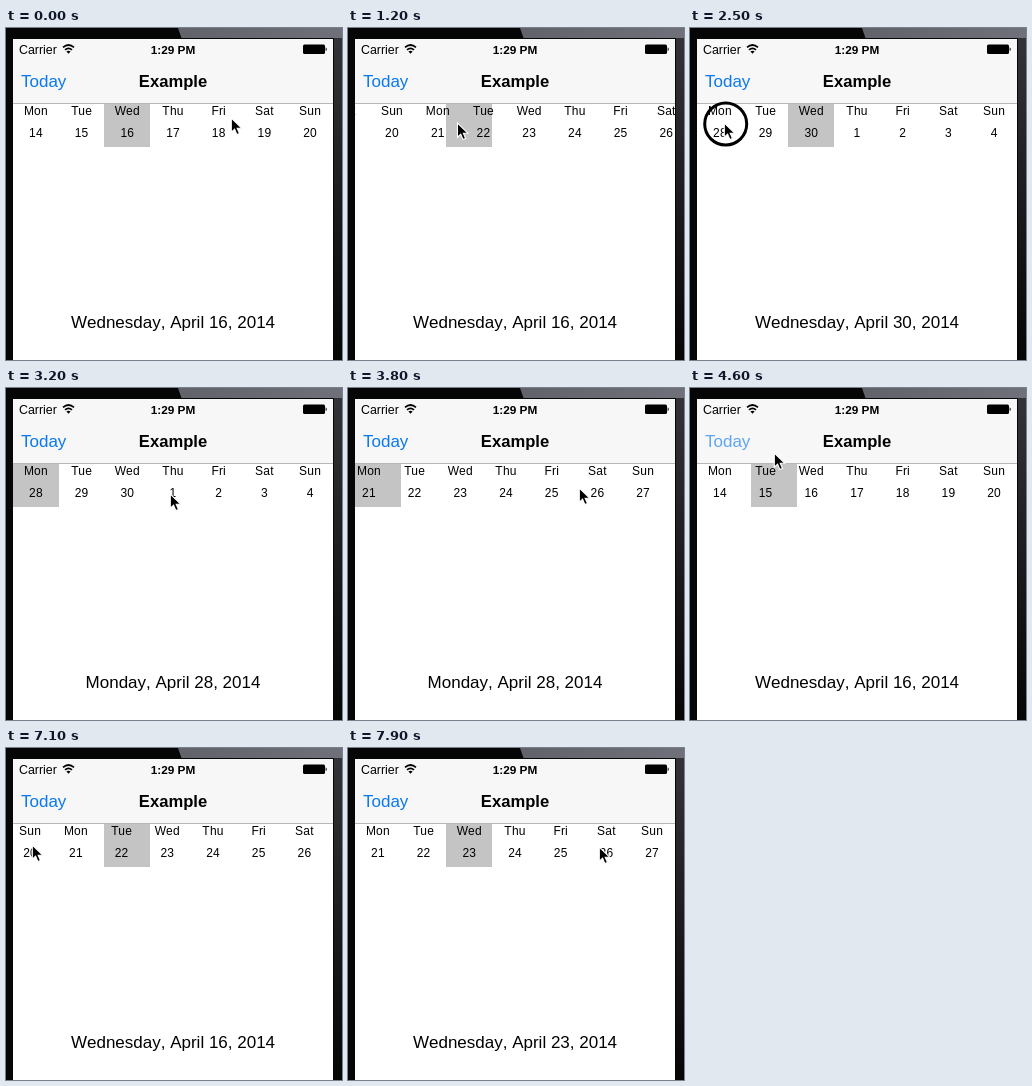
Animation, 336 px wide and 332 px high, one loop 8000 ms. Source, as an HTML page:

```html
<!DOCTYPE html>
<html lang="en">
<head>
<meta charset="utf-8">
<title>Week calendar</title>
<style>
html, body { margin: 0; width: 100%; height: 100%; overflow: hidden; background: #000; }
svg { display: block; width: 336px; height: 332px; font-family: "Liberation Sans", Arial, sans-serif; }
.mid { text-anchor: middle; }
.days { font-size: 12px; letter-spacing: .2px; }
</style>
</head>
<body>
<svg viewBox="0 0 336 332">
  <defs>
    <linearGradient id="gloss" x1="0" x2="1">
      <stop offset="0" stop-color="#62626a"/>
      <stop offset="1" stop-color="#70707a"/>
    </linearGradient>
    <linearGradient id="side" x1="0" y1="0" x2="0" y2="1">
      <stop offset="0" stop-color="#34343a"/>
      <stop offset="1" stop-color="#060607"/>
    </linearGradient>
    <clipPath id="screen"><rect x="7" y="11" width="320" height="321"/></clipPath>
  </defs>
  <rect width="336" height="332" fill="#060607"/>
  <rect x="328" width="8" height="332" fill="url(#side)"/>
  <path d="M172 0H336V10H175.5Z" fill="url(#gloss)"/>
  <rect x="7" y="11" width="320" height="321" fill="#fff"/>
  <g clip-path="url(#screen)">
    <rect id="mark" y="75" width="46" height="44" fill="#c4c4c4"/>
    <g id="days" class="mid days"></g>
  </g>
  <rect x="7" y="11" width="320" height="64" fill="#f7f7f7"/>
  <rect x="7" y="75" width="320" height="1" fill="#b8b8b8"/>

  <text x="13" y="26" font-size="12.4">Carrier</text>
  <g fill="none" stroke="#000" stroke-width="1.7">
    <path d="M57 19.4Q62.5 14.6 68 19.4"/>
    <path d="M59 21.9Q62.5 18.8 66 21.9"/>
  </g>
  <path d="M60.4 23.5Q62.5 21.8 64.6 23.5L62.5 25.8Z"/>
  <text class="mid" x="167" y="26" font-size="11.8" font-weight="bold">1:29 PM</text>
  <rect x="297" y="16.5" width="22" height="9.5" rx="1.5"/>
  <path d="M319.6 19.2Q322 21.2 319.6 23.2Z"/>

  <text id="today" x="15" y="59" font-size="17" fill="#0a78f0">Today</text>
  <text class="mid" x="167" y="59" font-size="16.6" font-weight="bold">Example</text>
  <text id="date" class="mid" x="167" y="300" font-size="17" style="font-kerning: none"></text>

  <g id="cursor">
    <circle id="ring" cx=".7" cy="1" r="21" fill="none" stroke="#000" stroke-width="3"/>
    <path d="M-.7 0V14.2L2.6 11.2L4.9 16.6L7.5 15.5L5.2 10.2H9.7Z" stroke="#fff" stroke-width="1.1"/>
  </g>
</svg>
<script>
const LOOP = 8000, FRAME = 100, LEFT = 7, WIDTH = 320, COL = WIDTH / 7;
const FIRST = 14, TODAY = 16;
const LEAD = 40, HOLD = 150, SLIDE = 250, TURN = 500;
const NAMES = ["Monday", "Tuesday", "Wednesday", "Thursday", "Friday", "Saturday", "Sunday"];

// Pointer actions: tap picks a day, home presses Today, turn swipes by weeks
const moves = [
  { at: 150, x: 215, y: 95, tap: 18 },
  { at: 500, x: 36, y: 40, tap: TODAY, home: true },
  { at: 986, x: 299, y: 95, to: 106, turn: 1 },
  { at: 1880, x: 285, y: 96, to: 90, turn: 1 },
  { at: 2450, x: 35, y: 95, tap: 28 },
  { at: 3150, x: 165, y: 106 },
  { at: 3452, x: 150, y: 100, to: 232, turn: -1 },
  { at: 3800, x: 232, y: 100 },
  { at: 4410, x: 38, y: 53, tap: TODAY, home: true },
  { at: 4640, x: 85, y: 65 },
  { at: 5150, x: 152, y: 106 },
  { at: 5700, x: 166, y: 8 },
  { at: 6200, x: 52, y: 55 },
  { at: 6850, x: 226, y: 97, to: 27, turn: 1 },
  { at: 7150, x: 27, y: 97 },
  { at: 7900, x: 252, y: 99 }
];

const el = id => document.getElementById(id);
const unit = p => Math.min(1, Math.max(0, p));
const smooth = p => p * p * (3 - 2 * p);
const easeOut = p => 1 - (1 - p) ** 3;
const weekday = d => (d - FIRST) % 7;

for (let d = FIRST; d < FIRST + 21; d++) {
  const x = (LEFT + COL * (d - FIRST + .5)).toFixed(1);
  const add = (y, s) => {
    const n = document.createElementNS("http://www.w3.org/2000/svg", "text");
    n.setAttribute("x", x);
    n.setAttribute("y", y);
    n.textContent = s;
    el("days").append(n);
  };
  add(87, NAMES[weekday(d)].slice(0, 3));
  add(109, d > 30 ? d - 30 : d);
}

function calendar(t) {
  let week = 0, col = weekday(TODAY), day = TODAY, fade = 1;
  for (const m of moves) {
    const age = t - m.at;
    if (age < 0) break;
    if (m.turn) {
      week += m.turn * easeOut(unit(age / TURN));
      if (age >= TURN) day += 7 * m.turn;
    }
    if (m.tap) {
      col += (weekday(m.tap) - col) * smooth(unit((age - 50) / SLIDE));
      if (age > 80) day = m.tap;
    }
    if (m.home) {
      fade = .2 + .8 * unit((age - 80) / 200);
      if (age > 50) week = 0;
    }
  }
  return { week, col, day, fade };
}

function pointer(t) {
  let last = { x: 226, y: 90, end: 0 };
  for (const m of moves) {
    const start = m.at - LEAD, end = m.at + HOLD, to = m.to ?? m.x;
    if (t < start) {
      const p = smooth((t - last.end) / (start - last.end));
      return { x: last.x + (m.x - last.x) * p, y: last.y + (m.y - last.y) * p, down: false };
    }
    if (t < end) {
      const p = smooth(unit((t - m.at) / HOLD));
      return { x: m.x + (to - m.x) * p, y: m.y, down: Boolean(m.tap || m.turn) };
    }
    last = { x: to, y: m.y, end };
  }
  return { ...last, down: false };
}

function draw(t) {
  const { week, col, day, fade } = calendar(t);
  const { x, y, down } = pointer(t);
  el("days").setAttribute("transform", `translate(${-WIDTH * week} 0)`);
  el("mark").setAttribute("x", Math.round(LEFT + COL * col));
  el("today").setAttribute("opacity", fade);
  el("date").textContent = `${NAMES[weekday(day)]}, April ${day}, 2014`;
  el("cursor").setAttribute("transform", `translate(${x} ${y})`);
  el("ring").setAttribute("opacity", down ? 1 : 0);
}

// The picture advances ten times a second
function tick() {
  draw(Math.floor(performance.now() % LOOP / FRAME) * FRAME);
  requestAnimationFrame(tick);
}
tick();
</script>
</body>
</html>
```
